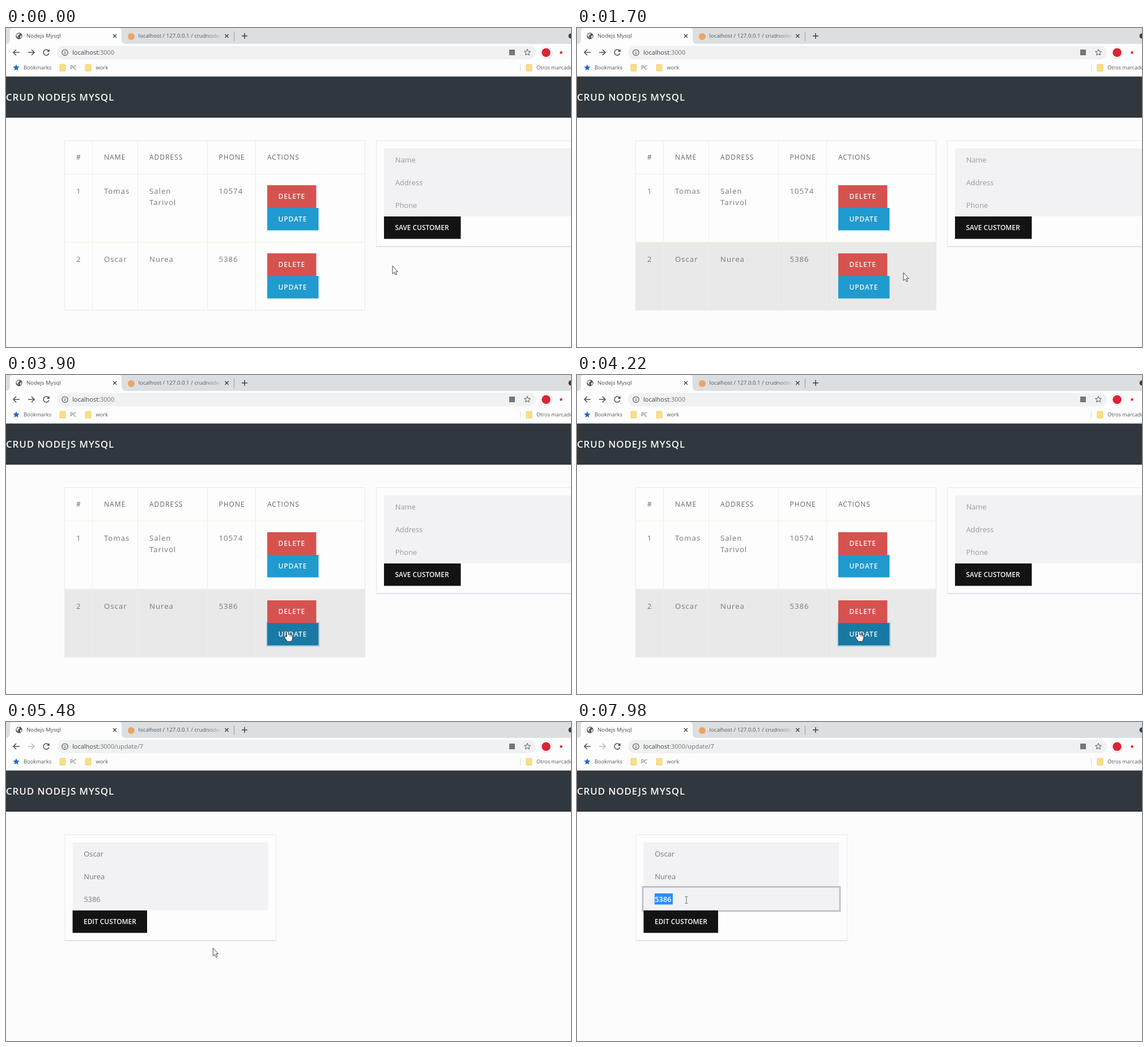
An HTML page for the animation above (8000 ms loop, 997 by 562 pixels).

```html
<!DOCTYPE html>
<html lang="en">
<head>
<meta charset="utf-8">
<title>CRUD demo</title>
<style>
  html, body { margin: 0; width: 100%; height: 100%; overflow: hidden; background: #fcfcfc; }
  svg { display: block; width: 997px; height: 562px; font-family: "Open Sans", "Noto Sans", sans-serif; }
  text { white-space: pre; }
</style>
</head>
<body>
<svg id="stage" viewBox="0 0 997 562" xmlns="http://www.w3.org/2000/svg"></svg>
<script>
const LOOP = 8000, NAVIGATE = 4300, PRESS = 3800, FOCUS = 7100, SELECT = 7280;

const attrs = o => Object.entries(o).map(([k, v]) => ` ${k}="${v}"`).join('');
const rect = (x, y, w, h, fill, more = {}) => `<rect${attrs({ x, y, width: w, height: h, fill, ...more })}/>`;
const circle = (cx, cy, r, fill, more = {}) => `<circle${attrs({ cx, cy, r, fill, ...more })}/>`;
const line = (d, stroke, width = 1, more = {}) =>
  `<path${attrs({ d, stroke, 'stroke-width': width, fill: 'none', ...more })}/>`;
// y is the middle of the capital letters
const text = (x, y, str, size, fill, weight = 400, spacing = 0, more = {}) =>
  `<text${attrs({ x, y: y + size * 0.36, 'font-size': size, fill, 'font-weight': weight,
    'letter-spacing': spacing, ...more })}>${str}</text>`;
const group = (id, content) => `<g id="${id}">${content}</g>`;

function star(cx, cy, r, fill, stroke) {
  const points = Array.from({ length: 10 }, (_, i) => {
    const a = i * Math.PI / 5, d = i % 2 ? r * 0.45 : r;
    return `${cx + d * Math.sin(a)},${cy - d * Math.cos(a)}`;
  }).join(' ');
  return `<polygon${attrs({ points, fill, stroke })}/>`;
}

const cross = (x, y) => line(`M${x - 3} ${y - 3}l6 6m0-6l-6 6`, '#3c4043', 1.4);
const folder = x => rect(x, 64, 10, 12, '#fade85', { stroke: '#eccb68', 'stroke-width': 0.8, rx: 1 });

function browser() {
  const ink = '#505356';
  return rect(0, 0, 997, 28, '#dbdfe1') +
    rect(0, 28, 997, 57.5, '#fdfdfd') +
    '<path d="M0 28Q7 28 7 20V5Q7 0 12 0H199Q204 0 204 5V20Q204 28 212 28Z" fill="#fdfdfd"/>' +
    circle(23, 14, 5.8, '#54585c') +
    '<path d="M19 11l4-2 1 2-3 3 1 3-2-1-2-3ZM25 14l3-1-1 4-2 1Z" fill="#e8eaec"/>' +
    text(36, 14, 'Nodejs Mysql', 9.7, '#4a4d50') + cross(192, 14) +
    circle(221, 15, 6, '#eda561') +
    text(233.5, 14, 'localhost / 127.0.0.1 / crudnodemysql', 9.7, 'url(#tabFade)', 400, 0, { 'clip-path': 'url(#tabClip)' }) +
    cross(389.5, 14) +
    line('M402.5 6V23', '#9b9fa2') + line('M416 14h10m-5-5v10', '#3c4043', 1.5) +
    circle(997, 14, 4.5, '#3c4043') +
    line('M24 43H13m5-5l-5 5 5 5', ink, 1.6) +
    line('M39 43h11m-5-5l5 5-5 5', ink, 1.6, { id: 'forward' }) +
    line('M75 40A5 5 0 1 0 75.8 44.5', ink, 1.6) + '<path d="M76.8 37v5h-5Z" fill="#505356"/>' +
    rect(90, 31.5, 845, 23.5, '#eff1f2', { rx: 11.7 }) +
    circle(104, 43.2, 5.2, 'none', { stroke: ink, 'stroke-width': 1.2 }) +
    line('M104 42.3v3.8m0-6v1.3', ink, 1.2) +
    text(117, 43.5, 'localhost<tspan fill="#75797c">:3000<tspan id="route">/update/7</tspan></tspan>', 11, '#44474a') +
    rect(888, 38, 10, 10, '#73777a') + star(920, 43.2, 5.7, 'none', ink) +
    circle(953, 43.5, 10.5, '#fff', { stroke: '#e3e4e5' }) + circle(953, 43.2, 7.8, '#dc2435') +
    rect(977.5, 41.3, 4, 4, '#dd2a2a') +
    star(18, 70, 6, '#1d66d2', 'none') + text(31, 70, 'Bookmarks', 9.3, '#55585b') +
    folder(95) + text(113, 70, 'PC', 9.3, '#55585b') +
    folder(140) + text(158.5, 70, 'work', 9.3, '#55585b') +
    line('M907.5 64V76', '#d4d7d9') + folder(918) + text(936, 70, 'Otros marcados', 9.2, '#55585b');
}

const button = (x, y, w, h, fill, label, spacing, id, size = 12) =>
  rect(x, y, w, h, fill, { id }) +
  text(x + 19.5, y + 19.5, label, size, '#f6f6f6', 600, spacing, { id: id + 'Label' });

function card(x, w, fieldWidth, fields, color, label, buttonWidth, id) {
  return rect(x + 0.5, 198.5, w, 186.5, '#fdfdfd', { stroke: '#e9e9f0' }) +
    line(`M${x} 385.2h${w + 1}`, '#d6d6e8', 1.2) +
    rect(x + 14, 212, fieldWidth, 119.5, '#f2f2f4') +
    fields.map((f, i) => text(x + 33.7, 232 + 40 * i, f, 12.9, color, 400, 0, { id: id + 'Field' + i })).join('') +
    button(x + 14, 332, buttonWidth, 39.5, '#131313', label, 0, id, 11.9);
}

const columns = [124, 173, 253, 375.5, 461];
const dividers = [152.5, 232.5, 355.5, 440.5];

function tableRow(y, cells, n) {
  return cells.map((cell, i) => cell.split(' ')
    .map((word, k) => text(columns[i], y + 30 + 20 * k, word, 13.2, '#777', 400, 1)).join('')).join('') +
    button(461, y + 20, 86.5, 40, '#d6524f', 'DELETE', 0.9, 'delete' + n) +
    button(461, y + 60, 90.5, 39.5, '#1f9bcf', 'UPDATE', 0.9, 'update' + n);
}

function listPage() {
  return rect(103.5, 198.5, 530, 298.5, '#fdfdfd') +
    rect(104, 377, 529.5, 120, '#e9e9e9', { id: 'rowHover' }) +
    dividers.map(x => line(`M${x} 199V497`, '#efefe7')).join('') +
    line('M104 257.2H633M104 377.2H633', '#f0f0e2') +
    rect(103.5, 198.5, 530, 298.5, 'none', { stroke: '#e8e8f1' }) +
    ['#', 'NAME', 'ADDRESS', 'PHONE', 'ACTIONS']
      .map((h, i) => text(columns[i], 227.5, h, 12, '#666', 400, 1)).join('') +
    tableRow(257, ['1', 'Tomas', 'Salen Tarivol', '10574'], 1) +
    rect(460, 436, 92.5, 41.5, 'none', { id: 'ring', stroke: '#b4cfdb', 'stroke-width': 2 }) +
    tableRow(377, ['2', 'Oscar', 'Nurea', '5386'], 2) +
    card(653, 372, 345, ['Name', 'Address', 'Phone'], '#9a9a9c', 'SAVE CUSTOMER', 135.5, 'save');
}

function editPage() {
  return card(103.5, 372.5, 345, ['Oscar', 'Nurea', '5386'], '#7a7a7c', 'EDIT CUSTOMER', 131.5, 'edit') +
    group('focus', rect(116, 290.5, 348, 42.5, 'none', { stroke: '#c2c2cb', 'stroke-width': 3 }) +
      rect(117.5, 332, 131.5, 4, '#131313')) +
    group('selection', rect(137, 302, 32, 19.5, '#2f8cf3') + text(137.2, 312, '5386', 12.9, '#fff', 600));
}

const pointers =
  group('arrow', '<path d="M0 0V14L3.2 11.2L5.4 16L7.6 15L5.5 10.3H9.4Z" fill="#fff" stroke="#333" stroke-width=".9"/>') +
  group('hand', '<path d="M-1.6 10V1.4Q0-1 1.6 1.4V6.4Q3.6 5.4 4.3 7Q6 6 6.7 7.6Q8.8 7 8.8 9.4V13L6.6 18.6H-.4L-4.8 12.6Q-6 9.8-3.8 9.6Z" fill="#fff" stroke="#333"/>' +
    line('M4.2 7V10.2M6.6 7.8V10.6', '#555', 0.8)) +
  group('beam', line('M-2.5-6H-.6L0-5.4L.6-6H2.5M0-5.4V5.4M-2.5 6H-.6L0 5.4L.6 6H2.5', '#666', 1));

const $ = id => document.getElementById(id);
$('stage').innerHTML =
  `<defs><clipPath id="tabClip">${rect(230, 0, 148, 28)}</clipPath>
   <linearGradient id="tabFade" gradientUnits="userSpaceOnUse" x1="355" x2="379">
     <stop stop-color="#55595c"/><stop offset="1" stop-color="#c8cccf"/></linearGradient></defs>` +
  rect(0, 0, 997, 562, '#fcfcfc') + browser() +
  rect(0, 85.5, 997, 72.5, '#30373d') +
  text(0, 121.5, 'CRUD NODEJS MYSQL', 17, '#f5f5f5', 600, 0.8) +
  group('list', listPage()) + group('edit-page', editPage()) + group('pointer', pointers);

// time, x, y of the pointer's hot spot
const path = [
  [0, 682, 419], [600, 682, 419], [1500, 576, 431], [1820, 576, 431], [2200, 532, 462],
  [2480, 501, 461], [2780, 499, 451], [3100, 499, 451], [3400, 500, 460], [3700, 497, 451],
  [5080, 497, 451], [5820, 262, 357], [6150, 215, 336], [6500, 193, 313.5], [LOOP, 193, 313.5]
];

function pointerAt(t) {
  const i = path.findIndex(p => p[0] > t), [t0, x0, y0] = path[i - 1], [t1, x1, y1] = path[i];
  const p = (t - t0) / (t1 - t0), e = p * p * (3 - 2 * p);
  return [x0 + (x1 - x0) * e, y0 + (y1 - y0) * e];
}

const show = (id, on) => $(id).style.display = on ? '' : 'none';

function draw(t) {
  const [x, y] = pointerAt(t), editing = t >= NAVIGATE;
  const over = (l, top, r, b) => x >= l && x < r && y >= top && y < b;
  const onUpdate = !editing && over(461, 437, 551.5, 477);
  const onEdit = editing && over(117.5, 332, 249, 371.5);
  const onField = editing && over(117.5, 212, 463, 332);
  const staleHand = editing && t < 5080;

  show('list', !editing);
  show('edit-page', editing);
  show('route', editing);
  $('forward').setAttribute('stroke', editing ? '#b9bcbe' : '#505356');

  show('rowHover', over(104, 377, 633, 497));
  show('ring', t >= PRESS);
  $('update2').setAttribute('fill', t >= PRESS ? '#187aa4' : onUpdate ? '#1a84b0' : '#1f9bcf');

  const loading = t < 4600;
  $('edit').setAttribute('fill', loading ? '#2b2b2b' : onEdit ? '#050505' : '#131313');
  $('editLabel').setAttribute('fill', loading ? '#d8d8d8' : '#f6f6f6');
  show('focus', t >= FOCUS);
  show('selection', t >= SELECT);

  const shape = onField ? 'beam' : onUpdate || onEdit || staleHand ? 'hand' : 'arrow';
  for (const id of ['arrow', 'hand', 'beam']) show(id, id === shape);
  $('pointer').setAttribute('transform', `translate(${x} ${y})`);
}

let start;
function frame(now) {
  start ??= now;
  draw((now - start) % LOOP);
  requestAnimationFrame(frame);
}
draw(0);
requestAnimationFrame(frame);
</script>
</body>
</html>
```
